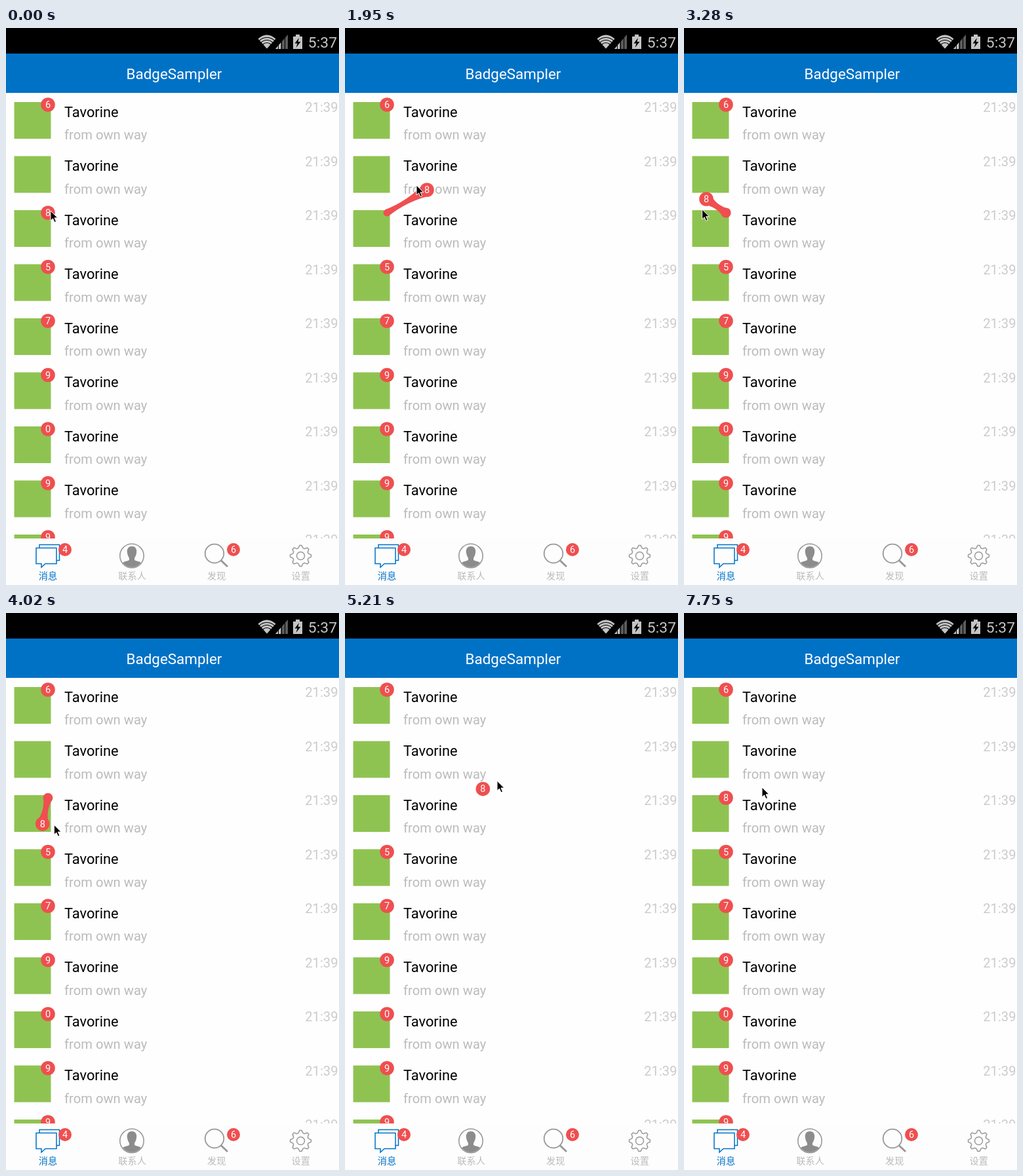
Animation of 508 by 850 pixels, one loop 8000 ms. Source, as an HTML page with a canvas:

```html
<!DOCTYPE html>
<html lang="zh">
<head>
<meta charset="utf-8">
<title>Draggable badge</title>
<style>
html, body { margin: 0; width: 100%; height: 100%; overflow: hidden; background: #fefefe; }
canvas { display: block; }
</style>
</head>
<body>
<canvas id="stage" width="508" height="850"></canvas>
<script>
const c = document.getElementById('stage').getContext('2d');
const LOOP = 8000, STEP = 148.8, BLUE = '#0072c6', RED = '#ef4f50', GREY = '#bbb';
const ROW = 82.5, HOME = [64, 282], BREAK = 90;
const GRAB = 4, RELEASE = 52;
const counts = ['6', '', '8', '5', '7', '9', '0', '9', '9'];

// Key points of the drag: step, x, y
const keys = [
  [4, 66, 281], [6, 89, 277], [10, 123, 264], [13, 125, 247],
  [14, 109, 238], [17, 82, 234], [22, 34, 261], [24, 26, 292],
  [26, 40, 320], [31, 127, 314], [32, 136, 306], [34, 188, 282],
  [37.5, 249, 239], [41, 195, 242], [45, 119, 264]
];

const slope = (i, axis) => {
  const a = keys[i - 1], b = keys[i + 1];
  return a && b ? (b[axis] - a[axis]) / (b[0] - a[0]) : 0;
};

// Smooth curve through the key points, at rest at both ends
function dragAt(step) {
  const n = Math.min(step, keys.at(-1)[0]);
  const i = Math.max(1, keys.findIndex(k => k[0] >= n));
  const a = keys[i - 1], b = keys[i], span = b[0] - a[0], s = (n - a[0]) / span;
  const ease = s * s * (3 - 2 * s);
  return [1, 2].map(axis => a[axis] + (b[axis] - a[axis]) * ease
    + span * s * (1 - s) * ((1 - s) * slope(i - 1, axis) - s * slope(i, axis)));
}

function text(s, x, y, size, color, align = 'left') {
  c.font = `${size}px Roboto, "Noto Sans CJK SC", "Noto Sans CJK", sans-serif`;
  c.textAlign = align;
  c.fillStyle = color;
  c.fillText(s, x, y);
}

function disc(x, y, r, color) {
  c.fillStyle = color;
  c.beginPath();
  c.arc(x, y, r, 0, 7);
  c.fill();
}

function ring(x, y, r, color, width) {
  c.strokeStyle = color;
  c.lineWidth = width;
  c.beginPath();
  c.arc(x, y, r, 0, 7);
  c.stroke();
}

function rect(x, y, w, h, color) {
  c.fillStyle = color;
  c.fillRect(x, y, w, h);
}

function shape(d, fill, stroke, width = 1.5) {
  const p = new Path2D(d);
  if (fill) { c.fillStyle = fill; c.fill(p); }
  if (stroke) { c.strokeStyle = stroke; c.lineWidth = width; c.stroke(p); }
}

function badge(x, y, n, r = 10.8) {
  disc(x, y, r, RED);
  text(n, x, y + 5, 14.5, '#fff', 'center');
}

function statusBar() {
  const light = '#c4c4c4';
  rect(0, 0, 508, 39, '#000');
  shape('M398 31.5L384.500 16.500Q398 4.500 411.500 16.500Z', light);
  for (const r of [8.5, 12.5, 16.5]) ring(398, 31, r, '#000', 1.2);
  shape('M411 32L430 10V32Z', '#5c5c5c');
  shape('M411 32L419 22.7V32Z', light);
  for (const x of [415, 420, 425]) rect(x, 10, 1, 22, '#000');
  shape('M438 13H442V10H448V13H452V32H438Z', light);
  shape('M447 15L440.5 23.5H444.5L442.5 30L449.5 21H445.5Z', '#000');
  text('5:37', 505, 30, 22.9, light, 'right');
}

function header() {
  rect(0, 39, 508, 60, BLUE);
  text('BadgeSampler', 256.5, 78, 22.4, '#fff', 'center');
}

function list() {
  counts.forEach((n, i) => {
    const y = i * ROW;
    rect(12.5, 113 + y, 56, 56, '#8fc351');
    text('Tavorine', 89, 135.5 + y, 21.8, '#000');
    text('from own way', 89, 170 + y, 20.2, GREY);
    text('21:39', 506.5, 128 + y, 20.2, '#ccc', 'right');
    if (n && i !== 2) badge(HOME[0], 117 + y, n);
  });
}

function gear(x, y) {
  c.beginPath();
  for (let i = 0; i < 32; i++) {
    const r = i % 4 < 2 ? 16 : 12.3, a = (i - 0.5) * Math.PI / 16 - Math.PI / 2;
    c.lineTo(x + r * Math.cos(a), y + r * Math.sin(a));
  }
  c.closePath();
  c.strokeStyle = '#999';
  c.lineWidth = 1.5;
  c.stroke();
  ring(x, y, 6, '#999', 1.5);
}

function tabs() {
  rect(0, 779, 508, 71, '#fdfdfd');
  shape('M51 793V788.5H81.5V812.5H77', null, BLUE);
  shape('M46 793.5H77V817.5H60L54 823V817.5H46Z', null, BLUE);
  ring(192, 805.5, 18.2, '#999', 1.6);
  shape('M192 791C198 791 200 796 199 801C198.5 805 197 807 196 809V812C200 814 204 814 206 816Q200 823 192 823Q184 823 178 816C180 814 184 814 188 812V809C187 807 185.5 805 185 801C184 796 186 791 192 791Z', '#8c8c8c');
  ring(318, 802, 14.3, '#999', 1.8);
  shape('M328 812.5L338 822', null, '#999', 3);
  gear(449.5, 805.5);
  ['消息', '联系人', '发现', '设置'].forEach((s, i) =>
    text(s, 64 + i * 128.6, 841, 14.2, i ? GREY : BLUE, 'center'));
  badge(90, 796, '4', 10);
  badge(347, 796, '6', 10);
}

// Elastic tail between the anchor and the dragged badge
function tail(x, y) {
  const [hx, hy] = HOME, dx = x - hx, dy = y - hy, d = Math.hypot(dx, dy);
  if (d > BREAK || d < 1) return;
  const r = 10 - d * 0.065, end = 10, nx = -dy / d, ny = dx / d;
  const mx = (x + hx) / 2, my = (y + hy) / 2;
  disc(hx, hy, r, RED);
  c.beginPath();
  c.moveTo(hx + nx * r, hy + ny * r);
  c.quadraticCurveTo(mx, my, x + nx * end, y + ny * end);
  c.lineTo(x - nx * end, y - ny * end);
  c.quadraticCurveTo(mx, my, hx - nx * r, hy - ny * r);
  c.fill();
}

function cursor(x, y) {
  c.save();
  c.translate(x, y);
  c.lineJoin = 'round';
  shape('M0 0V15L3.5 11.8L6 17.5L8.5 16.4L6 10.8H10.8Z', '#000', '#fff', 1);
  c.restore();
}

function draw(now) {
  const n = Math.floor((now % LOOP + 5) / STEP);
  const held = n >= GRAB && n < RELEASE;
  const [x, y] = held ? dragAt(n) : HOME;
  rect(0, 0, 508, 850, '#fefefe');
  list();
  statusBar();
  header();
  tabs();
  if (held) tail(x, y);
  badge(x, y, '8');
  // The pointer runs one step ahead of the badge
  const [px, py] = n < GRAB ? [68, 277] : dragAt(n + 1);
  cursor(px, py + 2);
}

let start;
function tick(now) {
  start ??= now;
  draw(now - start);
  requestAnimationFrame(tick);
}
draw(0);
requestAnimationFrame(tick);
</script>
</body>
</html>
```
